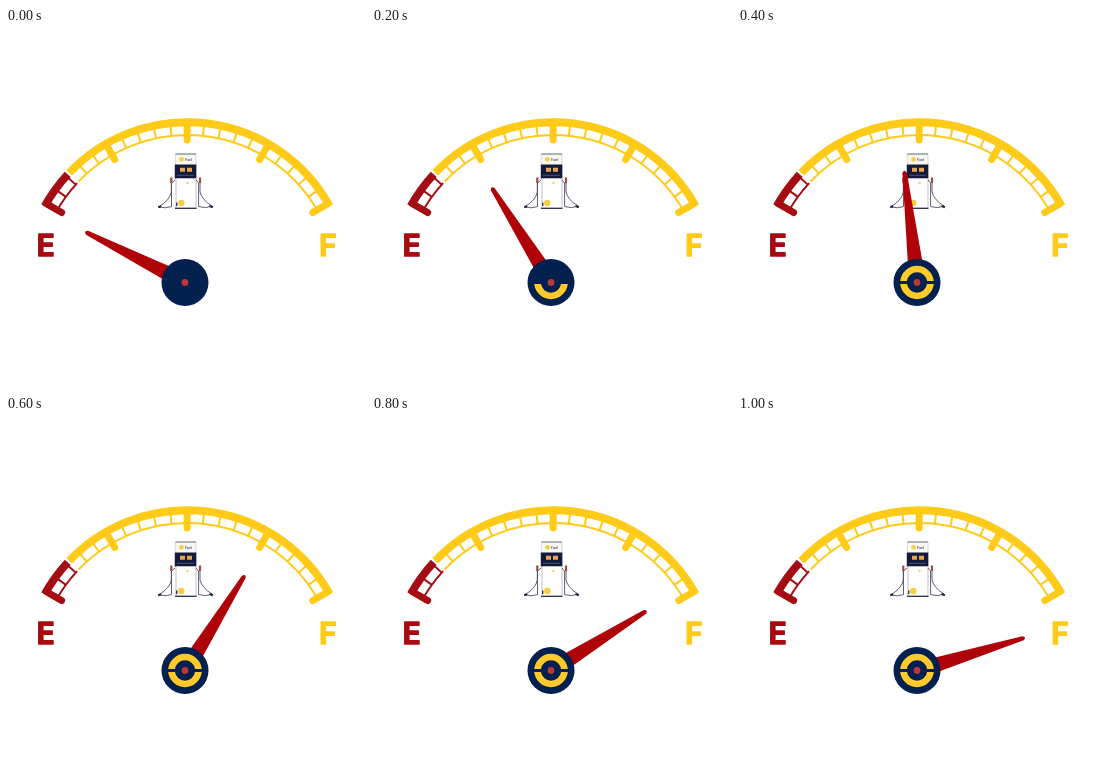
An HTML page for the animation above (1.2 s loop, 360 by 360 pixels).

```html
<!DOCTYPE html>
<html lang="en">
<head>
<meta charset="utf-8">
<title>Fuel gauge</title>
<style>
  html, body { margin: 0; width: 100%; height: 100%; overflow: hidden; background: #fff; }
  svg { display: block; width: 100%; height: 100%; }
  .letter { font: 600 29.5px Inter, Roboto, sans-serif; text-anchor: middle; stroke-width: 1.7; stroke-linejoin: round; }
  .label { font: 700 3.4px Inter, sans-serif; fill: #596079; }
</style>
</head>
<body>
<svg viewBox="0 0 360 360">
  <g id="dial" fill="none"></g>

  <text class="letter" x="39.6" y="228" fill="#a80a10" stroke="#a80a10">E</text>
  <text class="letter" x="322" y="228" fill="#ffca18" stroke="#ffca18">F</text>

  <g id="pump">
    <path d="M169.3 126H190V150.5H169.3Z" fill="#f8f7f2" stroke="#c4c5cb" stroke-width=".6"/>
    <path d="M169.5 126H190" stroke="#555a6c" stroke-width=".8"/>
    <circle cx="175.5" cy="131.3" r="2.4" fill="#f6ce4c"/>
    <text class="label" x="179" y="132.6">Fuel</text>
    <path d="M168.8 136.5H190.3V150.5H168.8Z" fill="#141a3c"/>
    <path d="M174 139.8h5v4h-5zM181 139.8h5v4h-5z" fill="#e9a552"/>
    <path d="M171 147.3H188" stroke="#5a5f7c" stroke-width=".8"/>
    <path d="M170 150.5V180.3H190V150.5" fill="#fefefe" stroke="#9a9da8" stroke-width=".6"/>
    <path d="M169 180.3H190.5" stroke="#20243a" stroke-width="1.2"/>
    <circle cx="181.5" cy="155" r="1.3" fill="#f6d667"/>
    <circle cx="175.3" cy="175" r="3.2" fill="#f7cd42"/>
    <path d="M170.7 174.5v3.5" stroke="#30344c" stroke-width="1.4"/>
    <g fill="none" stroke="#4a4e62" stroke-width=".9">
      <path d="M165.3 154V164Q164 172 153 178.7Q159 181 165.5 178.6V155L169 152"/>
      <path d="M194 154V164Q196 172 206 178Q200 181 192.6 178.6V155L190 152"/>
    </g>
    <path d="M165.3 149.5V155M194 149.5V155" stroke="#a6483f" stroke-width="2.2"/>
    <path d="M152.2 179.2l3-1M203.5 178l3.4 1.2" stroke="#20243a" stroke-width="2"/>
  </g>

  <g transform="translate(179 254.5)">
    <path id="needle" d="M-8 -8L-2.2 -110.3Q0 -114.5 2.2 -110.3L8 -8Z" fill="#b00309"/>
    <circle r="23.5" fill="#03204e"/>
    <path id="lower" d="M-16.8 1.6A16.9 16.9 0 0 0 16.8 1.6H10A10.1 10.1 0 0 1 -10 1.6Z" fill="#ffca2b"/>
    <path id="upper" d="M-16.8 -1.6A16.9 16.9 0 0 1 16.8 -1.6H10A10.1 10.1 0 0 0 -10 -1.6Z" fill="#ffca2b"/>
    <circle r="3.4" fill="#b8383b"/>
  </g>
</svg>
<script>
const $ = id => document.getElementById(id);
const YELLOW = '#ffca18', RED = '#a50d14';

// Point on the dial, angle in degrees clockwise from the top
const at = (r, deg) => {
  const a = deg * Math.PI / 180;
  return `${(181.2 + r * Math.sin(a)).toFixed(2)} ${(257 - r * Math.cos(a)).toFixed(2)}`;
};
const line = (d, color, width, cap = 'butt') =>
  `<path d="${d}" stroke="${color}" stroke-width="${width}" stroke-linecap="${cap}"/>`;
const arc = (r, from, to, color, width) =>
  line(`M${at(r, from)}A${r} ${r} 0 0 1 ${at(r, to)}`, color, width);

let dial = '';
for (const [from, to, color] of [[-61, -47.2, RED], [-46.4, 61, YELLOW]]) {
  dial += arc(162.8, from, to, color, 8) + arc(150, from, to, color, 2);
}
for (let deg = -60; deg <= 60; deg += 6) {
  const major = deg % 30 === 0;
  const color = deg < -47 ? RED : YELLOW;
  dial += line(`M${at(major ? 163 : 161, deg)}L${at(major ? 145 : 150, deg)}`,
    color, major ? 7 : 2, major ? 'round' : 'butt');
}
$('dial').innerHTML = dial;

const STEP = 200;
const angles = [-63.2, -32.2, -6.7, 31.9, 57.9, 73];

function draw(now) {
  const pose = Math.floor(now / STEP) % angles.length;
  $('needle').setAttribute('transform', `translate(.5 0) rotate(${angles[pose]})`);
  $('lower').setAttribute('visibility', pose > 0 ? 'visible' : 'hidden');
  $('upper').setAttribute('visibility', pose > 1 ? 'visible' : 'hidden');
  requestAnimationFrame(() => draw(performance.now() - start));
}
const start = performance.now();
draw(0);
</script>
</body>
</html>
```
